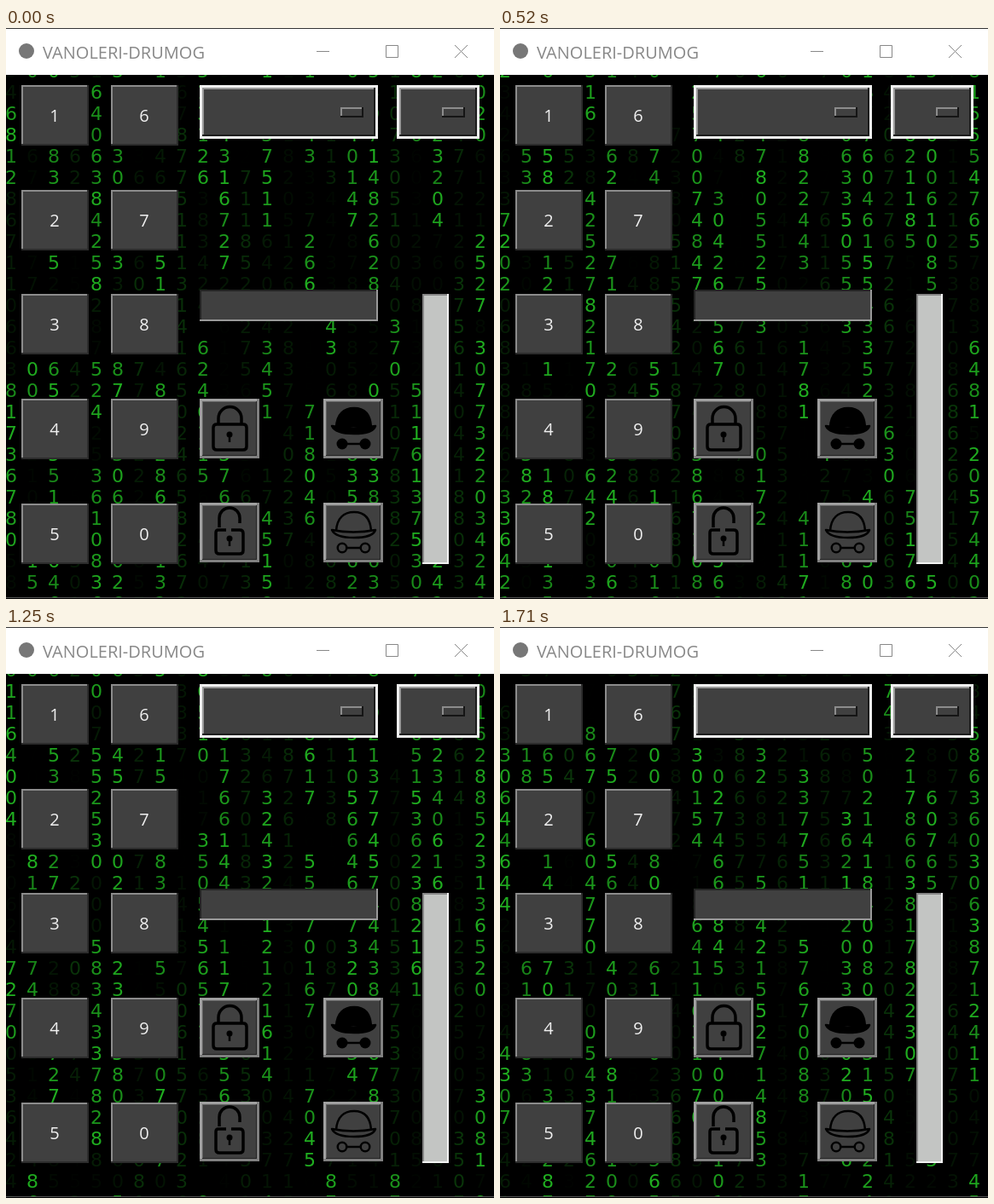
Animation of 572x670 px, one loop 1.84 s. Source, as an HTML page with a canvas:

```html
<!DOCTYPE html>
<html lang="en">
<head>
<meta charset="utf-8">
<title>Keypad over digit rain</title>
<style>
  html, body { margin: 0; width: 100%; height: 100%; overflow: hidden; background: #000; }
  canvas { display: block; }
</style>
</head>
<body>
<canvas id="stage" width="572" height="670"></canvas>
<script>
const ctx = document.getElementById('stage').getContext('2d');

const LOOP = 1840;
const STEP_TIMES = [0, 70, 190, 320, 390, 520, 650, 780, 850, 980, 1050, 1180, 1250, 1380, 1510, 1580, 1710];
const PITCH = 25;
const FACE = '#404040';

// Lit stretches [first, last] per column, in rows at step 0; they fall one row per step.
const STREAMS = {
  0: [[-13, -6], [1, 4], [14, 21]],
  1: [[-13, -12], [-4, 2], [11, 15], [21, 23]],
  2: [[-13, -12], [-9, -1], [3, 8], [13, 24]],
  4: [[-14, -12], [-9, -4], [0, 9], [13, 15], [18, 24]],
  5: [[-14, 8], [12, 24]],
  7: [[-13, 1], [6, 10], [14, 24]],
  9: [[-13, -9], [-5, 4], [12, 18]],
  10: [[-12, -3], [0, 8], [16, 19]],
  12: [[-13, -12], [-7, 6], [12, 15], [20, 24]],
  14: [[-12, -7], [-4, 3], [7, 10], [15, 20]],
  15: [[11, 12]],
  16: [[-10, 6], [17, 24]],
  17: [[-13, 9], [14, 24]],
  18: [[-16, -15], [11, 13]],
  19: [[-13, 2], [14, 24]],
  20: [[-11, 6], [18, 24]],
  22: [[-14, 2], [7, 10], [12, 24]]
};
const FAINT_COLUMNS = [3, 6, 8, 11, 13, 15, 18, 21];

function noise(a, b, c) {
  const n = Math.sin(a * 127.1 + b * 311.7 + c * 74.7) * 43758.5453;
  return n - Math.floor(n);
}

function brightness(col, u) {
  const runs = STREAMS[col] || [];
  if (runs.some(([first, last]) => u >= first && u <= last)) return 0.75 + 0.25 * noise(col, u, 5);
  const reach = FAINT_COLUMNS.includes(col) ? 0.3 : 0.16;
  return reach * noise(col, Math.floor((u + col) / 5), 9);
}

function drawRain(step) {
  ctx.save();
  ctx.beginPath();
  ctx.rect(0, 55, 564, 613);
  ctx.clip();
  ctx.font = '22px "DejaVu Sans", sans-serif';
  ctx.textAlign = 'center';
  ctx.textBaseline = 'alphabetic';
  ctx.fillStyle = '#20b020';
  for (let col = 0; col < 23; col++) {
    for (let row = -1; row < 25; row++) {
      ctx.globalAlpha = brightness(col, row - step);
      const digit = Math.floor(noise(col + 1, row + 2, step + 1) * 9);
      ctx.fillText(digit, 6 + col * PITCH, 83 + row * PITCH);
    }
  }
  ctx.restore();
}

function box(x, y, w, h, color) {
  ctx.fillStyle = color;
  ctx.fillRect(x, y, w, h);
}

// Bevelled rectangle: light colours the top and left, shade the bottom and right.
function bevel(x, y, w, h, size, light, shade, face = FACE) {
  box(x, y, w, h, shade);
  box(x, y, w - size, size, light);
  box(x, y, size, h - size, light);
  box(x + size, y + size, w - 2 * size, h - 2 * size, face);
}

function stroke(path, color = '#000', width = 1) {
  ctx.strokeStyle = color;
  ctx.lineWidth = width;
  ctx.stroke(new Path2D(path));
}

function disc(x, y, r, color) {
  ctx.fillStyle = color;
  ctx.beginPath();
  ctx.arc(x, y, r, 0, 2 * Math.PI);
  ctx.fill();
}

function drawTitleBar() {
  box(0, 0, 572, 55, '#fff');
  box(0, 0, 572, 1, '#333');
  disc(24, 27, 9, '#777');
  ctx.fillStyle = '#888';
  ctx.font = '20px "Open Sans", sans-serif';
  ctx.textAlign = 'left';
  ctx.textBaseline = 'alphabetic';
  ctx.fillText('VANOLERI-DRUMOG', 43, 36);
  stroke('M364 27.5H379 M445.5 20.5h14v14h-14z M526 20l15 15M541 20l-15 15', '#888');
}

function drawKeys() {
  for (let i = 0; i < 10; i++) {
    const x = i < 5 ? 18 : 123;
    const y = 67 + Math.round((i % 5) * 122.7);
    bevel(x, y, 79, 71, 2, '#8c8c8c', '#2c2c2c');
    ctx.fillStyle = '#f0f0f0';
    ctx.font = '20px "Open Sans", sans-serif';
    ctx.textAlign = 'center';
    ctx.textBaseline = 'alphabetic';
    ctx.fillText((i + 1) % 10, x + 39, y + 43);
  }
}

function drawMenu(x, w) {
  box(x, 67, w, 63, '#f0f0f0');
  bevel(x + 3, 70, w - 6, 57, 2, '#999', '#1c1c1c');
  bevel(x + w - 44, 93, 27, 12, 2, '#8c8c8c', '#151515');
}

function drawLock(y, open) {
  const shackle = open
    ? 'M250 29V18a12 12 0 0 1 24 0V24'
    : 'M249 29V23a13.5 13.5 0 0 1 27 0V29';
  const body = open
    ? 'M258 32H249q-3 0-3 3V56q0 4 4 4H274q4 0 4-4V36q0-4-4-4H264'
    : 'M247 30H278q4 0 4 4V56q0 4-4 4H247q-4 0-4-4V34q0-4 4-4z';
  ctx.save();
  ctx.translate(0, y);
  stroke(shackle, '#000', 3.5);
  stroke(body, '#000', 3.5);
  disc(262, 42, 3.5, '#000');
  stroke('M262 42V51', '#000', 2.5);
  ctx.restore();
}

function drawHat(y, filled) {
  const dome = 'M387 33C388 18 396 11 408 11S427 18 428 33';
  const brim = 'M382 32Q407 37 433 32Q430 41 408 41T382 32z';
  ctx.save();
  ctx.translate(0, y);
  ctx.lineJoin = 'round';
  if (filled) {
    ctx.fillStyle = '#000';
    ctx.fill(new Path2D(dome));
    ctx.fill(new Path2D(brim));
  }
  stroke(dome, '#000', 2.5);
  stroke(brim, '#000', 2.5);
  stroke('M399 53H416', '#000', 2.5);
  for (const x of [394, 421]) {
    disc(x, 53, 6.5, '#000');
    if (!filled) disc(x, 53, 4, FACE);
  }
  ctx.restore();
}

function drawIconButtons() {
  for (const y of [435, 557]) {
    for (const x of [227, 372]) {
      bevel(x, y, 70, 70, 3, '#a0a0a0', '#808080');
      bevel(x + 3, y + 3, 64, 64, 1, '#606060', '#222');
    }
    drawLock(y, y > 500);
    drawHat(y, y < 500);
  }
}

function draw(now) {
  const time = now % LOOP;
  const step = STEP_TIMES.filter(t => t <= time).length - 1;
  box(0, 0, 572, 670, '#000');
  drawRain(Math.max(0, step));
  box(0, 668, 572, 1, '#555');
  drawTitleBar();
  drawKeys();
  drawMenu(227, 209);
  drawMenu(458, 97);
  bevel(227, 307, 209, 37, 2, '#242424', '#999');
  drawIconButtons();
  bevel(488, 312, 31, 317, 2, '#858585', '#f2f2f2', '#c3c5c3');
}

const start = performance.now();
function tick() {
  draw(performance.now() - start);
  requestAnimationFrame(tick);
}
tick();
</script>
</body>
</html>
```
